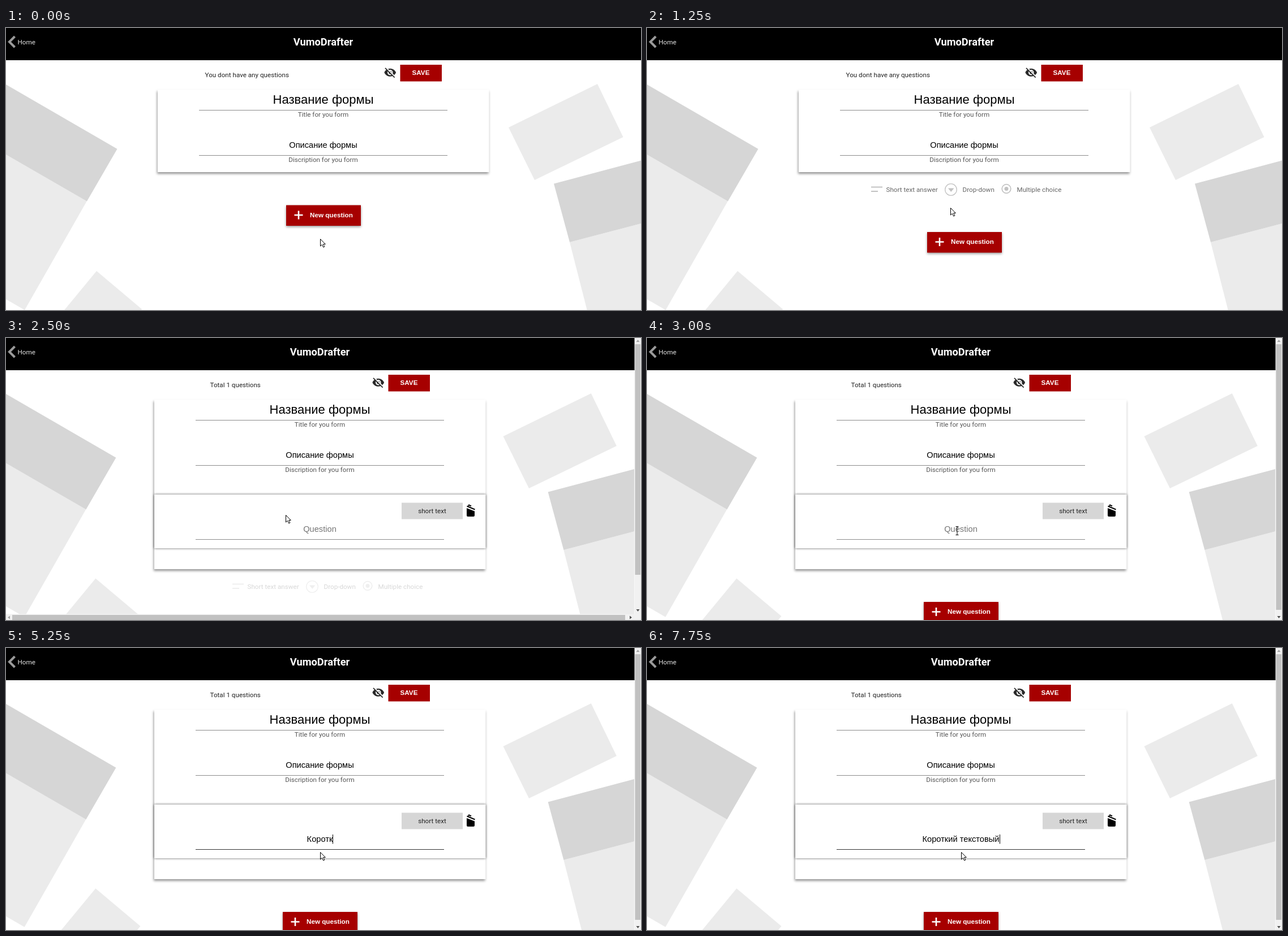
These frames come from a looping animation (1122 px wide and 499 px high, 8 s). An HTML page:

```html
<!DOCTYPE html>
<html lang="en">
<head>
<meta charset="utf-8">
<title>Form builder</title>
<style>
  html, body { margin: 0; width: 100%; height: 100%; overflow: hidden; background: #fff; }
  svg { display: block; width: 1122px; height: 499px; }
  text { font: 11.67px Roboto, sans-serif; fill: #222; }
  .mid { text-anchor: middle; }
  .arial { font-family: "Liberation Sans", Arial, sans-serif; }
  .brand { font-size: 18.3px; font-weight: 700; fill: #fff; }
  .title { font-size: 22px; fill: #000; }
  .field { font-size: 14.67px; fill: #000; }
  .hint { fill: #555; }
  .btn { font-weight: 700; fill: #fff; }
  .dark { fill: #d6d6d6; }
  .light { fill: #ebebeb; }
  .red { fill: #a60000; }
  .line { stroke: #8c8c8c; }
  .card { fill: #fff; filter: drop-shadow(-1px 3px 2px rgba(0, 0, 0, .42)); }
  .item { fill: #fff; filter: drop-shadow(0 0 2px rgba(0, 0, 0, .65)); }
  .raised { filter: drop-shadow(0 2px 2px rgba(0, 0, 0, .4)); }
  .option { fill: #666; }
  .icon { fill: none; stroke: #c2c2c2; stroke-width: 1.7; }
  .track { fill: #f1f1f1; }
  .thumb { fill: #c1c1c1; }
  .off { fill: #a3a3a3; }
  .on { fill: #505050; }
</style>
</head>
<body>
<svg viewBox="0 0 1122 499">
  <defs>
    <path id="tip" d="M-2 -3L2 0L-2 3z"/>
  </defs>

  <g id="backdrop">
    <path class="light" d="M0 224L143 306L33 499L0 480z"/>
    <path class="dark" d="M0 100L196.500 214L143 306.500L0 224z"/>
    <path class="light" d="M160 430L240 497.500L225.500 515H90z"/>
    <path class="light" d="M1045 99L1090.500 193L934 269L888 176z"/>
    <path class="light" d="M996 379L1122 346V520H1032z"/>
    <path class="dark" d="M968 275.500L1122 234.500V346L996 379z"/>
  </g>

  <rect width="1122" height="57"/>
  <path d="M15.500 15L6 24.500L15.500 34" fill="none" stroke="#9a9a9a" stroke-width="4"/>
  <text x="20.500" y="29" style="fill:#e4e4e4">Home</text>

  <text id="total" y="87"></text>
  <g id="tools">
    <path transform="translate(667.500 67.500) scale(.94)" fill="#2b2b2b" d="M12 7c2.760 0 5 2.240 5 5 0 .65-.13 1.260-.36 1.830l2.920 2.920c1.510-1.260 2.700-2.890 3.430-4.750-1.730-4.390-6-7.500-11-7.500-1.400 0-2.740.25-3.980.7l2.160 2.160C10.740 7.130 11.350 7 12 7zM2 4.270l2.740 2.740C3.080 8.300 1.780 10.020 1 12c1.730 4.390 6 7.500 11 7.500 1.550 0 3.030-.3 4.380-.84L19.730 22 21 20.730 3.270 3zM7.530 9.800l1.550 1.550c-.05.21-.08.43-.08.65 0 1.660 1.340 3 3 3 .22 0 .44-.03.65-.08l1.550 1.550c-.67.33-1.410.53-2.200.53-2.760 0-5-2.240-5-5 0-.79.2-1.530.53-2.200zm4.310-.78l3.150 3.150.02-.16c0-1.660-1.340-3-3-3z"/>
    <rect class="red" x="696.500" y="65" width="73.500" height="29.500"/>
    <text class="arial btn mid" x="733" y="83">SAVE</text>
  </g>

  <g id="page">
    <text class="brand mid" x="560.500" y="31">VumoDrafter</text>
    <rect class="card" id="card" x="268" y="109" width="585.500"/>
    <path class="line" d="M341 145.500H780M341 225.500H780"/>
    <text class="arial title mid" x="560.500" y="134">Название формы</text>
    <text class="hint mid" x="560.500" y="157">Title for you form</text>
    <text class="arial field mid" x="560.500" y="212">Описание формы</text>
    <text class="hint mid" x="560.500" y="237">Discription for you form</text>

    <g id="item">
      <rect class="item" x="268" y="277" width="585.500" height="95"/>
      <rect class="dark" x="705" y="291.500" width="108" height="29"/>
      <text class="mid" x="759" y="310">short text</text>
      <path d="M820 301L834 306.500V314q0 2-2 2h-10q-2 0-2-2z"/>
      <path d="M820.500 297.500L834.500 303.500M823 297l1-1.500 4 1.800" fill="none" stroke="#000" stroke-width="2"/>
      <path id="underline" d="M341 356.500H780"/>
      <text class="arial field mid" id="answer" x="560.500" y="343"></text>
      <rect id="caret" y="330" width="1" height="16.500"/>
    </g>

    <g id="options">
      <path class="icon" d="M396 281.500H416M396 289H408" style="stroke-width:2"/>
      <text class="option" id="short" x="422.500" y="289.500">Short text answer</text>
      <circle class="icon" cx="537" cy="286" r="10.300" style="stroke-width:1.300"/>
      <path d="M532 283.500h10.500l-5.250 6.500z" fill="#c2c2c2"/>
      <text class="option" x="557.500" y="289.500">Drop-down</text>
      <circle class="icon" cx="635" cy="284.500" r="7.800"/>
      <circle cx="635" cy="284.500" r="3.500" fill="#c2c2c2"/>
      <text class="option" x="653.500" y="290">Multiple choice</text>
    </g>

    <g id="add">
      <rect class="raised" id="face" x="495" width="132" height="36.500"/>
      <path d="M509.500 17.500h15M517 10v15" stroke="#fff" stroke-width="2.600"/>
      <text class="arial btn" x="537" y="21.300">New question</text>
    </g>
  </g>

  <g id="hbar">
    <rect class="track" y="488.500" width="1122" height="11"/>
    <rect class="thumb" id="hthumb" x="11" y="490" height="9"/>
    <use href="#tip" class="off" transform="translate(5 494.500) scale(-1 1)"/>
    <use href="#tip" class="on" id="hend"/>
  </g>
  <g id="vbar">
    <rect class="track" x="1110.500" width="12" height="499"/>
    <rect class="thumb" id="vthumb" x="1111.500" y="11" width="9.500"/>
    <use href="#tip" class="off" transform="translate(1116.500 5) rotate(-90)"/>
    <use href="#tip" class="on" id="vend"/>
  </g>

  <g id="cursor" fill="#fff" stroke="#000" stroke-linejoin="round">
    <path id="arrow" d="M.5 .5v12.500l3-2.700 2.200 4.700 2.200-1-2.200-4.500h3.600z"/>
    <path id="hand" d="M-1 9V1.500q1.200-1.800 2.400 0V6q2-.8 2.400.6 2-.6 2.400.8 1.800-.2 1.800 1.200v3.400l-1.600 4.500h-6L-4.500 11q-.4-2 1.500-1.700z"/>
    <path id="beam" d="M-2.500 -7.500h5M0 -7.500v15M-2.500 7.500h5"/>
  </g>
</svg>

<script>
const STEP = 250, LOOP = 8000;
const ANSWER = "Короткий текстовый";
const $ = id => document.getElementById(id);
const show = (id, on) => { $(id).style.display = on ? "" : "none"; };
const set = (id, attrs) => {
  for (const name in attrs) $(id).setAttribute(name, attrs[name]);
};

// pointer path, one stop per step: shape, x, y
const POINTER = [
  ["arrow", 555, 373], ["hand", 551, 340], ["hand", 548, 332], ["arrow", 546, 330],
  ["arrow", 543, 326], ["arrow", 536, 318], ["arrow", 520, 306], ["hand", 498, 291],
  ["hand", 484, 287], ["hand", 484, 288], ["arrow", 494, 313], ["beam", 525, 336],
  ["beam", 548, 341], ["beam", 557, 350], ["arrow", 555, 361]
];

// option row opacity while it enters and leaves
function optionFade(step) {
  if (step < 4 || step > 10) return 0;
  return { 4: .5, 10: .25 }[step] || 1;
}

function drawAnswer(step) {
  const typed = step < 17 ? 0 : Math.floor(1 + 1.25 * (step - 17));
  const answer = $("answer");
  answer.textContent = typed ? ANSWER.slice(0, typed) : "Question";
  answer.style.fill = typed ? "#000" : "#757575";
  show("caret", typed > 0);
  if (typed) set("caret", { x: Math.round(560.5 + answer.getComputedTextLength() / 2) });
  set("underline", { stroke: step > 12 ? "#333" : "#8c8c8c" });
}

function drawBars(step, created) {
  const wide = step === 3 || step === 4 || step === 10;
  const right = created ? 1105 : 1112, bottom = wide ? 430 : 492;
  show("hbar", wide);
  show("vbar", created);
  set("hthumb", { width: right - 22 });
  set("hend", { transform: `translate(${created ? 1104 : 1116.5} 494.5)` });
  set("vthumb", { height: bottom - 22 });
  set("vend", { transform: `translate(1116.5 ${wide ? 482 : 494}) rotate(90)` });
  if (created) set("vthumb", { height: wide ? 408 : 470 });
  else set("hthumb", { width: 1090 });
}

function draw(step) {
  const created = step >= 10;
  const fade = optionFade(step);
  const expanded = step >= 3 && step <= 10;

  set("backdrop", { transform: `scale(${created ? 1110 / 1122 : 1})` });
  set("page", { transform: `translate(${created ? -6 : 0} 0)` });
  set("tools", { transform: `translate(${created ? -21 : 0} 0)` });
  $("total").textContent = created ? "Total 1 questions" : "You dont have any questions";
  set("total", { x: created ? 360.5 : 351.5 });
  set("card", { height: created ? 300 : 146 });

  show("item", created);
  drawAnswer(step);

  set("options", {
    opacity: fade,
    transform: `translate(${fade < 1 ? 10 : 0} ${created ? 154 : 0})`
  });
  $("short").style.fill = step >= 7 && step <= 9 ? "#111" : "#666";

  const top = (created ? 467 : 313.5) + (expanded ? 47.5 : 0);
  set("add", { transform: `translate(0 ${top})` });
  set("face", { fill: step >= 1 && step <= 3 ? "#940000" : "#a60000" });

  drawBars(step, created);

  const [shape, x, y] = POINTER[Math.min(step, POINTER.length - 1)];
  for (const id of ["arrow", "hand", "beam"]) show(id, id === shape);
  set("cursor", { transform: `translate(${x} ${y})` });
}

const start = performance.now();
let last = -1;
function tick() {
  const step = Math.floor((performance.now() - start) % LOOP / STEP);
  if (step !== last) draw(last = step);
  requestAnimationFrame(tick);
}
tick();
</script>
</body>
</html>
```
